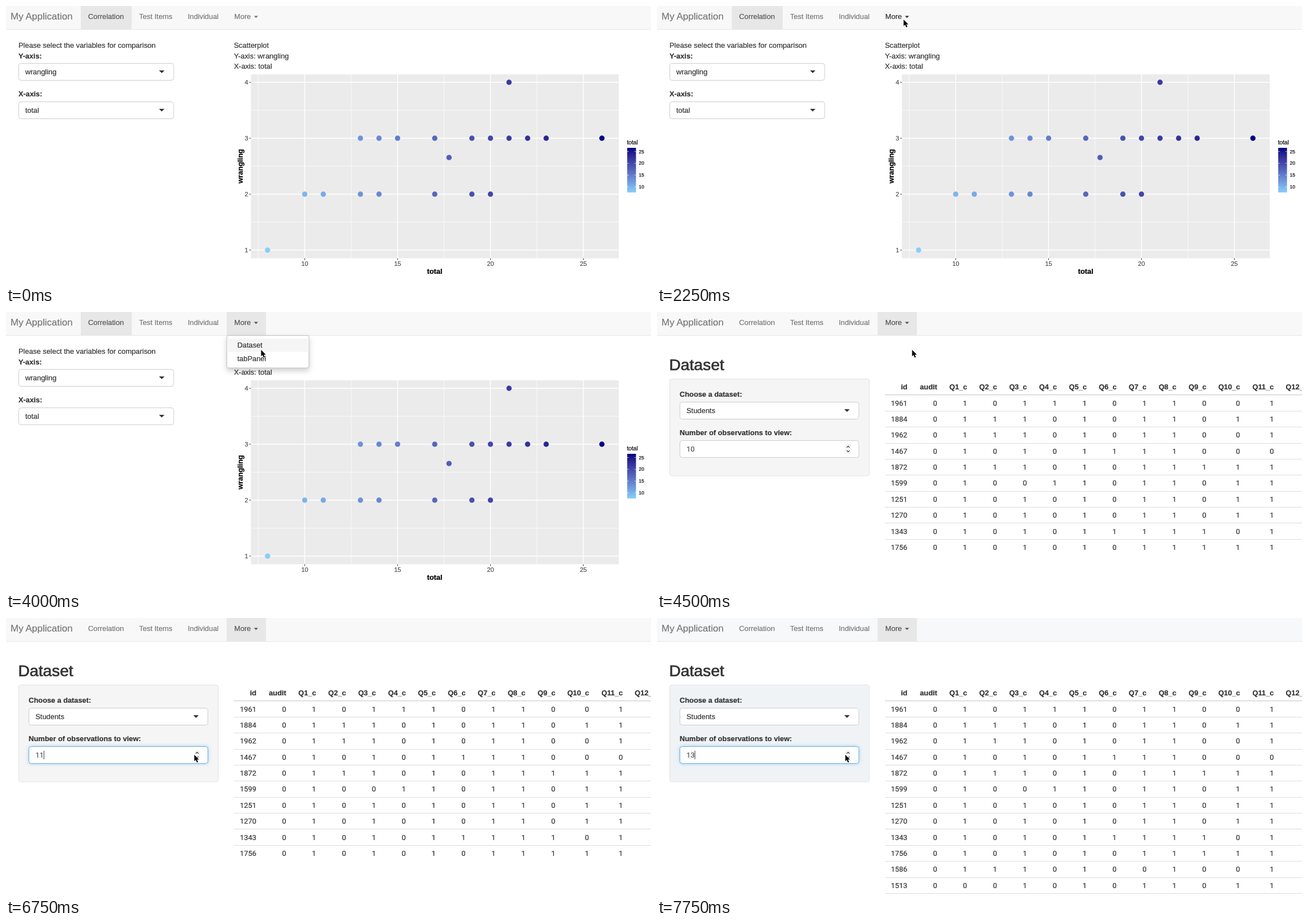
Animation of 1139x492 px, one loop 8 s. Source, as an HTML page:

```html
<!DOCTYPE html>
<html lang="en">
<head>
<meta charset="utf-8">
<title>Correlation and dataset demo</title>
<style>
  html, body { margin: 0; width: 100%; height: 100%; overflow: hidden; background: #fff; }
  svg { display: block; width: 100%; height: 100%; }
  text {
    font: 12.9px "Liberation Sans", Arial, sans-serif; white-space: pre;
    color: #333; fill: currentColor; stroke: currentColor; stroke-width: .2;
  }
  .b { font-weight: bold; font-size: 12.8px; }
  .num { font-family: Roboto, sans-serif; }
  .end { text-anchor: end; }
  .mid { text-anchor: middle; }
  .nav { color: #777; }
  .tick { font-size: 11px; color: #4d4d4d; }
  .axis { font-weight: bold; color: #000; }
  .field { fill: #fff; stroke: #ccc; }
  #focus { fill: #fff; stroke: #66afe9; filter: drop-shadow(0 0 3px rgba(102, 175, 233, .55)); }
  #menu > rect:first-child { fill: #fff; stroke: #bdbdbd; filter: drop-shadow(0 5px 5px rgba(0, 0, 0, .18)); }
</style>
</head>
<body>
<svg id="stage" viewBox="0 0 1139 492" xmlns="http://www.w3.org/2000/svg"></svg>
<script>
const text = (x, y, s, attrs = '') => `<text x="${x}" y="${y}" ${attrs}>${s}</text>`;
const rect = (x, y, w, h, attrs = '') => `<rect x="${x}" y="${y}" width="${w}" height="${h}" ${attrs}/>`;
const line = (x1, y1, x2, y2, color, width = 1) =>
  `<path d="M${x1} ${y1}L${x2} ${y2}" stroke="${color}" stroke-width="${width}"/>`;
const caret = (x, y, r, attrs = 'fill="#333"') => `<path d="M${x - r} ${y}h${2 * r}l${-r} ${r}z" ${attrs}/>`;
const range = n => [...Array(n).keys()];

const select = (x, y, w, value) =>
  rect(x + .5, y + .5, w, 30, 'rx="4" class="field"') +
  text(x + 12, y + 20, value) + caret(x + w - 20.5, y + 13, 4.8);

// Scatterplot
const px = v => 527.5 + (v - 10) * 32.8;
const py = v => 432 - (v - 1) * 99;
const shade = v => `color-mix(in lab, #000080 ${(v - 8) / 18 * 100}%, #87cefa)`;
const points = { 4: [21], 3: [13, 14, 15, 17, 19, 20, 21, 22, 23, 26], 2.655: [17.77],
                 2: [10, 11, 13, 14, 17, 19, 20], 1: [8] };

function plot() {
  let s = rect(432.5, 121, 649.5, 325.5, 'fill="#ebebeb"');
  for (const v of [7.5, 12.5, 17.5, 22.5]) s += line(px(v), 121, px(v), 446.5, '#fff', .7);
  for (const v of [1.5, 2.5, 3.5]) s += line(432.5, py(v), 1082, py(v), '#fff', .7);
  for (const v of [10, 15, 20, 25]) {
    s += line(px(v), 121, px(v), 446.5, '#fff', 1.4) + line(px(v), 446.5, px(v), 449.5, '#333') +
      text(px(v), 459.5, v, 'class="tick mid"');
  }
  for (const v of [1, 2, 3, 4]) {
    s += line(432.5, py(v), 1082, py(v), '#fff', 1.4) + line(429.5, py(v), 432.5, py(v), '#333') +
      text(427.5, py(v) + 4, v, 'class="tick end"');
  }
  for (const [y, xs] of Object.entries(points))
    for (const x of xs) s += `<circle cx="${px(x)}" cy="${py(y)}" r="4.7" style="fill:${shade(x)}"/>`;
  s += text(757, 473.5, 'total', 'class="axis mid"') +
    text(0, 0, 'wrangling', 'class="axis mid" transform="translate(417.5 283.5) rotate(-90)"');

  const stops = range(9).map(i => `<stop offset="${i / 8}" style="stop-color:${shade(26 - i * 18 / 8)}"/>`);
  s += `<linearGradient id="scale" x2="0" y2="1">${stops.join('')}</linearGradient>` +
    text(1096.5, 245, 'total', 'style="font-size:10.2px;color:#000"') +
    rect(1097, 251, 15.5, 79, 'fill="url(#scale)"');
  [25, 20, 15, 10].forEach((v, i) => {
    const y = 257.5 + i * 20.9;
    s += line(1097, y, 1100, y, '#fff', .6) + line(1109.5, y, 1112.5, y, '#fff', .6) +
      text(1117.5, y + 3, v, 'style="font-size:8.4px;color:#000"');
  });
  return s;
}

const correlationPage = () =>
  text(22, 74, 'Please select the variables for comparison') +
  text(22, 92.5, 'Y-axis:', 'class="b"') + select(22, 101, 273.5, 'wrangling') +
  text(22, 160, 'X-axis:', 'class="b"') + select(22, 169, 273.5, 'total') +
  text(402.5, 74, 'Scatterplot') + text(402.5, 92.5, 'Y-axis: wrangling') +
  text(402.5, 110.5, 'X-axis: total') + plot();

// Dataset table: id, audit, then one digit per question
const rows = ['1961 0 10111011001', '1884 0 11101011011', '1962 0 11101011001', '1467 0 10101111000',
  '1872 0 11101011111', '1599 0 10011011011', '1251 0 10101011011', '1270 0 10101011011',
  '1343 0 10101111101', '1756 0 10101011111', '1586 0 11101001001', '1513 0 00101011011'];
const colX = i => 442 + i * 52.8 + Math.max(0, i - 10) * 6.8;

function table() {
  const heads = ['id', 'audit', ...range(12).map(i => `Q${i + 1}_c`)];
  const rule = r => {
    const y = Math.round(146.475 + r * 28.375) + .5;
    return line(402.5, y, 1139, y, '#ddd');
  };
  let s = heads.map((h, i) => text(colX(i), 136.5, h, 'class="b end"')).join('') +
    line(402.5, 146.5, 1139, 146.5, '#ddd', 2);
  rows.forEach((row, r) => {
    const [id, audit, answers] = row.split(' ');
    const y = 165.5 + r * 28.375;
    s += `<g class="row">${r ? rule(r) : ''}` +
      [id, audit, ...answers].map((v, i) => text(colX(i), y, v, 'class="num end"')).join('') + '</g>';
  });
  return s + `<g class="row">${rule(rows.length)}</g>`;
}

const datasetPage = () =>
  text(21.5, 103, 'Dataset', 'style="font-size:28.2px;stroke-width:.7"') +
  rect(22.5, 118.5, 352.5, 171.5, 'id="well" rx="4" stroke="#e3e3e3"') +
  text(40, 150, 'Choose a dataset:', 'class="b"') + select(40, 159, 316, 'Students') +
  text(40, 217.5, 'Number of observations to view:', 'class="b"') +
  rect(40.5, 227.5, 316, 30, 'rx="4" class="field"') +
  rect(40.5, 227.5, 316, 30, 'rx="4" id="focus"') +
  text(52, 247, '10', 'id="count" class="num" style="color:#555"') +
  rect(66.5, 235, 1, 15, 'id="beam" fill="#333"') +
  rect(333, 234.5, 9, 16, 'rx="4" fill="#fff" stroke="#e4e4e4" stroke-width=".8"') +
  '<path d="M335 240l2.5-2.6 2.5 2.6M335 245l2.5 2.6 2.5-2.6" fill="none" stroke="#333" stroke-width="1.2"/>' +
  table();

const stage = document.getElementById('stage');
stage.innerHTML =
  rect(0, 0, 1139, 492, 'fill="#fff"') +
  rect(0, 0, 1139, 41, 'id="nav"') + line(0, 41.5, 1139, 41.5, '#e7e7e7') +
  rect(132, 0, 90, 41, 'id="tabBg" fill="#e7e7e7"') +
  rect(389.5, 0, 69.5, 41, 'id="moreBg" fill="#e7e7e7"') +
  text(8, 24, 'My Application', 'class="nav" style="font-size:17px"') +
  text(145, 23, 'Correlation', 'id="tab"') +
  text(235, 23, 'Test Items', 'class="nav"') +
  text(321, 23, 'Individual', 'class="nav"') +
  `<g id="more">${text(403, 23, 'More', 'style="color:inherit"')}${caret(441.5, 17.6, 3.7, 'fill="currentColor"')}</g>` +
  `<g id="correlation">${correlationPage()}</g><g id="dataset">${datasetPage()}</g>` +
  '<g id="menu">' + rect(390, 41.5, 145, 57.5, 'rx="3"') +
  rect(390.5, 47, 144, 23.5, 'id="hover" fill="#f5f5f5"') +
  text(408.5, 63, 'Dataset') + text(408.5, 87, 'tabPanel') + '</g>' +
  '<path id="cursor" d="M0 1V12.4L2.6 10.1 4.6 14.7 6.6 13.8 4.7 9.4H8.3Z" stroke="#fff" stroke-width="1.2" paint-order="stroke"/>';

// [start ms, value] steps
const cursorSteps = [[0, null], [1000, [607.5, 12]], [1250, [427, 6]], [1500, [422.5, 18]], [1750, [423.5, 20]],
  [2250, [435.5, 23]], [3000, [450.5, 69]], [4000, [450.5, 66]], [5250, [450.5, 74]],
  [5500, [413.5, 283]], [5750, [373.5, 267]], [6000, [341.5, 252]], [6250, [334, 244]], [6500, [332.5, 241]]];
const countSteps = [[0, 10], [6500, 11], [7500, 12], [7750, 13]];
const rowSteps = [[0, 10], [7000, 11], [7500, 12], [7750, 13]];
const focusSteps = [[0, 0], [6500, .5], [6750, 1]];
const beamSteps = [[0, 0], [6500, 1], [7000, 0], [7500, 1]];
const moreSteps = [[0, '#777'], [2250, '#333'], [2500, '#555']];
const at = (steps, t) => steps.findLast(s => s[0] <= t)[1];

const el = Object.fromEntries([...stage.querySelectorAll('[id]')].map(e => [e.id, e]));
const rowEls = stage.querySelectorAll('.row');
const show = (e, on) => { e.style.display = on ? '' : 'none'; };

function draw() {
  const t = performance.now() % 8000;
  const onDataset = t >= 4500;
  show(el.correlation, !onDataset);
  show(el.dataset, onDataset);
  show(el.tabBg, !onDataset);
  show(el.moreBg, t >= 2500);
  show(el.menu, t >= 2500 && !onDataset);
  show(el.hover, t >= 3000);
  el.tab.style.color = onDataset ? '#777' : '#555';
  el.more.style.color = at(moreSteps, t);
  el.nav.style.fill = t >= 7500 ? '#f6f8fa' : '#f8f8f8';
  el.well.style.fill = t >= 7500 ? '#f0f3f6' : '#f5f5f5';

  el.focus.style.opacity = at(focusSteps, t);
  el.count.textContent = at(countSteps, t);
  show(el.beam, at(beamSteps, t));
  const visible = at(rowSteps, t);
  rowEls.forEach((row, i) => show(row, i < visible));

  const tip = at(cursorSteps, t);
  show(el.cursor, tip);
  if (tip) el.cursor.setAttribute('transform', `translate(${tip})`);
  requestAnimationFrame(draw);
}
draw();
</script>
</body>
</html>
```
